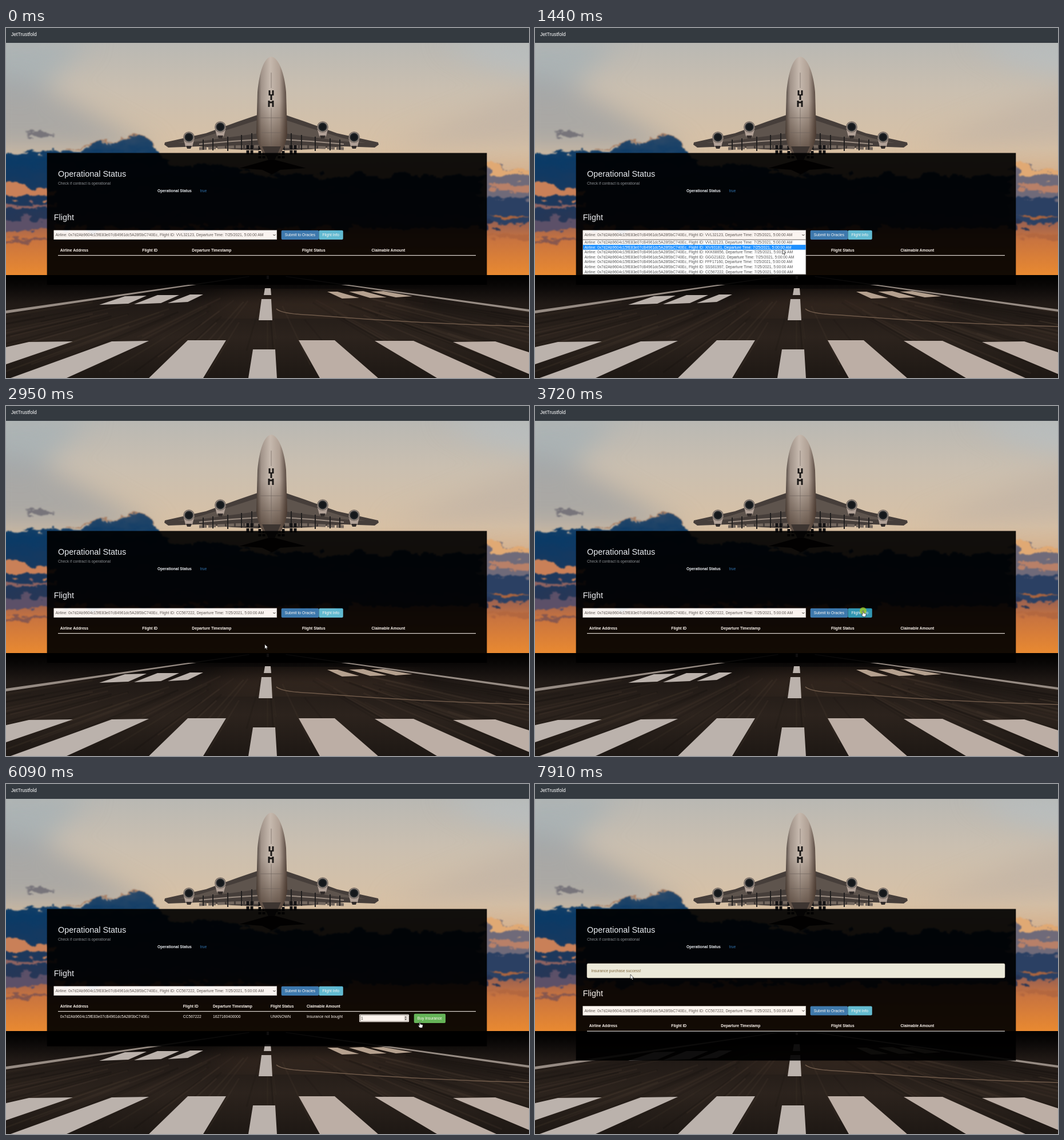
These frames come from a looping animation (915x612 px, 8000 ms). An HTML page:

```html
<!DOCTYPE html>
<html lang="en">
<head>
<meta charset="utf-8">
<title>Flight insurance demo</title>
<style>
html, body { margin: 0; width: 100%; height: 100%; overflow: hidden; background: #000; }
svg { position: absolute; left: 0; top: 0; width: 915px; height: 612px; }
#photo { will-change: transform; }
filter { color-interpolation-filters: sRGB; }
text { font: 6.72px Arial, "Liberation Sans", sans-serif; white-space: pre; }
.h2 { font-size: 14.4px; }
.brand { font-size: 8.64px; }
.b { font-weight: bold; }
</style>
</head>
<body>
<svg id="photo" viewBox="0 0 915 612">
  <defs>
    <linearGradient id="sky" x2="0" y2="1">
      <stop offset="0" stop-color="#b9b8b3"/><stop offset=".2" stop-color="#cabfb0"/>
      <stop offset=".45" stop-color="#d8c1a5"/><stop offset=".6" stop-color="#d2a983"/>
      <stop offset="1" stop-color="#ee8b2c"/>
    </linearGradient>
    <linearGradient id="dusk" x2="0" y2="1">
      <stop offset="0" stop-color="#8d5c56"/><stop offset=".4" stop-color="#c9743f"/>
      <stop offset="1" stop-color="#ea8a30"/>
    </linearGradient>
    <linearGradient id="cloud" x2="0" y2="1">
      <stop offset="0" stop-color="#2c4968"/><stop offset=".25" stop-color="#0a3a66"/>
      <stop offset="1" stop-color="#2b3654"/>
    </linearGradient>
    <linearGradient id="road" x2="0" y2="1">
      <stop offset="0" stop-color="#000"/><stop offset=".1" stop-color="#090706"/>
      <stop offset=".28" stop-color="#211a16"/><stop offset=".6" stop-color="#2c231d"/>
      <stop offset="1" stop-color="#1e1814"/>
    </linearGradient>
    <linearGradient id="hull">
      <stop offset="0" stop-color="#4c423c"/><stop offset=".16" stop-color="#a2948a"/>
      <stop offset=".45" stop-color="#c6b9ae"/><stop offset=".75" stop-color="#b0a094"/>
      <stop offset="1" stop-color="#4f4038"/>
    </linearGradient>
    <linearGradient id="shade" x2="0" y2="1">
      <stop offset=".45" stop-color="#4a3628" stop-opacity="0"/>
      <stop offset="1" stop-color="#3c2c22" stop-opacity=".75"/>
    </linearGradient>
    <radialGradient id="mouth">
      <stop offset=".5" stop-color="#15181b"/><stop offset=".72" stop-color="#2d3032"/>
      <stop offset=".82" stop-color="#9b8f86"/><stop offset="1" stop-color="#5a504a"/>
    </radialGradient>
    <filter id="soft" x="-30%" y="-30%" width="160%" height="160%"><feGaussianBlur stdDeviation="22"/></filter>
    <filter id="blur"><feGaussianBlur stdDeviation=".6"/></filter>
    <filter id="puff" x="-10%" y="-30%" width="120%" height="160%">
      <feTurbulence type="fractalNoise" baseFrequency=".035 .06" numOctaves="4" seed="4"/>
      <feDisplacementMap in="SourceGraphic" scale="30" xChannelSelector="R" yChannelSelector="G"/>
      <feGaussianBlur stdDeviation="1.1"/>
    </filter>
  </defs>

  <rect y="26" width="915" height="410" fill="url(#sky)"/>
  <g filter="url(#soft)">
    <path d="M-40 20H150L60 110-40 100Z" fill="#a3afb5" opacity=".7"/>
    <path d="M-40 80 60 100 270 215-40 215Z" fill="#959ca1" opacity=".65"/>
    <path d="M760 20H960V90L830 60Z" fill="#b7bfc3" opacity=".7"/>
    <path d="M660 210 960 90V200Z" fill="#bcafa3" opacity=".6"/>
  </g>
  <rect y="330" width="915" height="104" fill="url(#dusk)"/>
  <g filter="url(#puff)">
    <path d="M36 184 66 178 82 182 60 188Z" fill="#77747a"/>
    <path d="M-20 219 40 221 85 212 120 214 150 202 190 198 222 190 248 194 262 210 275 232 480 258 860 258V350H-20Z" fill="url(#cloud)"/>
    <path d="M105 211 150 201 190 196 222 189 250 193 262 208" fill="none" stroke="#a67b60" stroke-width="2"/>
    <path d="M-20 275 40 276 90 288 70 297-20 291Z" fill="#c98058"/>
    <path d="M-20 305 50 308 90 303V312L-20 316Z" fill="#8d6260"/>
    <path d="M-20 340 30 332 90 337V350L-20 358Z" fill="#5c5068"/>
    <path d="M-20 374 30 367 90 369 60 375Z" fill="#87574e"/>
    <path d="M830 244 865 238 890 247 940 253V310H830Z" fill="#6f6a79"/>
    <path d="M830 242 858 237 884 246 935 252 930 260 880 257 850 253Z" fill="#e0a974"/>
    <path d="M840 276 885 272 935 283 900 289 850 283Z" fill="#b88068"/>
    <path d="M830 299 880 296 940 303V340L870 345 830 338Z" fill="#2b4063"/>
    <path d="M840 327 880 324 920 329 885 333Z" fill="#a9643f"/>
    <path d="M830 364 870 359 940 361 900 369Z" fill="#b3673f"/>
  </g>

  <g id="plane">
    <path d="M408 245 465 229 525 245 480 248 465 256 448 248Z" fill="#1a1718"/>
    <g id="wing">
      <path d="M443 151 405 164 350 184 278 200 277 204 284 209 338 207 395 212 443 214Z" fill="#463e3a"/>
      <path d="M443 160 400 174 338 193 300 201 340 198 443 184Z" fill="#5e544d"/>
      <path d="M338 203 396 198 443 195" fill="none" stroke="#9b8d82" stroke-width="2"/>
      <path d="M338 211 396 208 443 207" fill="none" stroke="#74685f" stroke-width="5" stroke-dasharray="13 3"/>
      <path d="M345 195V213M362 193V214M388 190V215M412 187V213M430 184V213" stroke="#211f1f" stroke-width="2"/>
      <g id="engine">
        <path d="M365 174 369 189Q375 194 381 189L385 174Z" fill="#b0a096"/>
        <circle cx="375" cy="173" r="9.8" fill="url(#mouth)"/>
        <path d="M370 188 380 188 378 193H372Z" fill="#332d2b"/>
      </g>
      <use href="#engine" x="-55" y="18"/>
      <path d="M423 205V222M430 205V222M444 206V228M451 206V228" stroke="#141314" stroke-width="5" stroke-dasharray="7 2"/>
    </g>
    <use href="#wing" transform="translate(929) scale(-1 1)"/>
    <g id="body">
      <path id="tube" d="M464 50C451 52 443 78 440 112L438 185Q442 214 455 224H475Q488 214 492 185L490 112C487 78 477 52 464 50Z" fill="url(#hull)"/>
      <path d="M464 50C451 52 443 78 440 112L438 185Q442 214 455 224H475Q488 214 492 185L490 112C487 78 477 52 464 50Z" fill="url(#shade)"/>
    </g>
    <path d="M464 78V105M464 140V213M445 157H486M447 183H483" stroke="#6f645d" stroke-width=".7"/>
    <path d="M461 109V118M467 109V118M464 116V126M460 127V138M467 127V138M460 130H468" fill="none" stroke="#1b1817" stroke-width="3"/>
    <path d="M448 207H481L470 231H459Z" fill="#3d3531"/>
  </g>

  <rect y="432" width="915" height="180" fill="url(#road)"/>
  <ellipse cx="540" cy="482" rx="190" ry="16" fill="#5c4433" opacity=".45" filter="url(#soft)"/>
  <g id="streaks" stroke-width="3" filter="url(#blur)"></g>
  <g filter="url(#blur)" fill="#bbb2ac">
    <path d="M425 434 0 494V499L426 435ZM490 434 915 492V496L489 435Z" fill="#968b83"/>
    <path d="M456 433H460V439H456ZM453 455H463L464 467H451ZM447 474H464L466 511H442ZM432 562H471L474 612H424Z"/>
    <path d="M208 469 246 468 214 482 163 484ZM265 467 303 467 271 481 224 483ZM322 466 345 466 318 479 283 481Z"/>
    <path d="M562 461 580 461 618 472 588 473ZM600 461 625 460 666 471 637 472ZM638 461 660 460 711 469 682 471Z" fill="#b5a18f"/>
    <path d="M40 549 117 548 0 588V558ZM185 548 250 547 106 612H8ZM318 546 385 546 345 612H250Z"/>
    <path d="M512 546 575 546 651 612H549ZM645 547 713 547 858 612H754ZM782 549 856 548 915 567V605Z" fill="#bcaea5"/>
    <path d="M473 491Q482 500 535 502Q720 517 915 522" fill="none" stroke="#6f5a4a" stroke-width="1.6"/>
  </g>
</svg>

<svg viewBox="0 0 915 612">
  <rect width="915" height="26" fill="#343a40"/>
  <text class="brand" x="9" y="14" fill="#fff">JetTrustfold</text>
  <g id="panel" opacity=".92"></g>
  <g id="list"></g>
  <g id="pointer">
    <circle id="ring" r="6" fill="#a4cc1e" opacity=".75"/>
    <path id="arrow" d="M0 0V8.2L1.9 6.5 3.2 9.4 4.5 8.8 3.2 6H5.8Z" fill="#fff" stroke="#000" stroke-width=".6"/>
    <path id="hand" d="M-.8 .6Q0-.4 .8 .6V4L4.4 4.8Q5.4 5 5.2 6.4L4.4 10.3H-.2L-3 6.6Q-2.6 5.3-.8 6.5Z" fill="#fff" stroke="#000" stroke-width=".6"/>
    <path id="beam" d="M-1.5-4H1.5M0-4V4M-1.5 4H1.5" stroke="#222" stroke-width=".8"/>
  </g>
</svg>

<script>
const $ = id => document.getElementById(id);
const LOOP = 8000;
const ADDRESS = '0x7d2Ab9604c15fE83e07cB4961dc5A28f3bC740Ec';
const FLIGHTS = ['VVL32123', 'XIV93181', 'KKK68656', 'GGG21822', 'FFF17160', 'SSS61997', 'CC567222'];
const COLUMNS = ['Airline Address', 'Flight ID', 'Departure Timestamp', 'Flight Status', 'Claimable Amount'];
const ROW = [ADDRESS, 'CC567222', '1627160400000', 'UNKNOWN', 'Insurance not bought'];

// Pointer path: time, x, y
const PATH = [
  [0, 838, 624], [220, 838, 624], [420, 672, 500], [640, 520, 402], [900, 466, 364],
  [1310, 466, 364], [1440, 433, 387], [1560, 415, 415], [1690, 407, 429],
  [1800, 407, 429], [2020, 411, 428], [2500, 412, 428], [2750, 443, 421],
  [2900, 443, 421], [3250, 510, 390], [3600, 574, 358], [4260, 574, 358],
  [4450, 635, 407], [4620, 655, 417], [4900, 660, 410], [5710, 660, 410],
  [6090, 724, 416], [6350, 735, 413], [7080, 735, 413], [7300, 600, 388],
  [7600, 300, 345], [7910, 167, 333], [8000, 167, 333]
];
const CLICKS = [[1040, 1110], [2160, 2220], [3720, 3790], [4970, 5110], [6490, 6550]];

const between = (t, a, b) => t >= a && t < b;
const inside = (p, x, y, w, h) => between(p.x, x, x + w) && between(p.y, y, y + h);
const text = (x, y, s, fill = '#fff', cls = '') =>
  `<text x="${x}" y="${y}" fill="${fill}" class="${cls}">${s}</text>`;
const rect = (x, y, w, h, fill, more = '') =>
  `<rect x="${x}" y="${y}" width="${w}" height="${h}" fill="${fill}" ${more}/>`;
const button = (x, y, w, label, fill) =>
  rect(x, y, w, 16.2, fill, 'rx="2"') + text(x + 6, y + 10.5, label);
const option = i =>
  `Airline: ${ADDRESS}, Flight ID: ${FLIGHTS[i]}, Departure Time: 7/25/2021, 5:00:00 AM`;

function pointerAt(t) {
  const i = Math.max(1, PATH.findIndex(k => k[0] > t));
  const [t0, x0, y0] = PATH[i - 1], [t1, x1, y1] = PATH[i];
  const u = (t - t0) / (t1 - t0);
  return { x: x0 + (x1 - x0) * u, y: y0 + (y1 - y0) * u };
}

function amountField(s) {
  const ring = s.focus
    ? rect(618, 402.8, 87, 13.4, '#fff', 'rx="1.5"') + rect(619, 403.8, 85, 11.4, '#222', 'rx="1"')
    : rect(619, 403.5, 85.5, 12, '#777');
  return ring + rect(619.7, 404.3, 84, 10.5, '#fff') +
    text(621, 412, s.typed ? '1' : 'ETH amount', s.typed ? '#333' : '#777') +
    rect(696.5, 405, 5.5, 9, '#e4e4e4') +
    '<path d="M697.5 408.6 699.2 406.2 701 408.6ZM697.5 410.6 699.2 413 701 410.6Z" fill="#444"/>';
}

function drawPanel(s) {
  const xs = s.row ? [94.7, 309.7, 362, 462.7, 526] : [94.7, 238.3, 325.3, 518, 639.5];
  const bottom = s.alert ? 483.6 : s.row ? 458.6 : 449;
  const alert = rect(91, 314, 731, 25, '#fcf8e3', 'rx="2" stroke="#faebcc" stroke-width=".5"') +
    text(98.4, 328.6, 'Insurance purchase success!', '#8a6d3b');
  let flight = text(83.8, 336, 'Flight', '#fff', 'h2') +
    rect(83.8, 353.8, 390, 16, '#fff', 'stroke="#ccc" stroke-width=".5"') +
    text(86.6, 364.4, option(s.chosen), '#555') +
    '<path d="M467.4 361 469.4 363 471.4 361" fill="none" stroke="#222"/>' +
    button(481.7, 353.8, 65.6, 'Submit to Oracles', s.hover === 'submit' ? '#286090' : '#337ab7') +
    button(547.4, 353.8, 42.4, 'Flight Info', s.hover === 'info' ? (s.press ? '#269abc' : '#31b0d5') : '#5bc0de') +
    COLUMNS.map((c, i) => text(xs[i], 390.6, c, '#fff', 'b')).join('') +
    rect(91, 397, 731, 1.2, '#ddd');
  if (s.row) {
    flight += ROW.map((c, i) => text(xs[i], 409.2, c)).join('') + amountField(s) +
      button(713.8, 401.8, 55.2, 'Buy Insurance', s.hover === 'buy' ? '#449d44' : '#5cb85c');
  }
  $('panel').innerHTML = rect(71.7, 218.5, 769.6, bottom - 218.5, '#000') +
    text(91, 260, 'Operational Status', '#fff', 'h2') +
    text(91, 273.8, 'Check if contract is operational', '#999') +
    text(265, 287.4, 'Operational Status', '#fff', 'b') + text(339.6, 287.4, 'true', '#337ab7') +
    (s.alert ? alert : '') + `<g transform="translate(0 ${s.alert ? 34.6 : 0})">${flight}</g>`;
}

function drawList(s) {
  if (!s.open) return $('list').innerHTML = '';
  $('list').innerHTML = rect(83.7, 370.3, 390.2, 60.6, '#fff', 'stroke="#777" stroke-width=".6"') +
    FLIGHTS.map((_, i) => {
      const y = 370.5 + i * 8.6, on = i === s.lit;
      return (on ? rect(84, y, 389.6, 8.6, '#1e90ff') : '') +
        text(86.6, y + 6.5, option(i), on ? '#fff' : '#555');
    }).join('');
}

let shown = '';
function frame(now) {
  const t = now % LOOP, p = pointerAt(t);
  const row = between(t, 3850, 6600), alert = t >= 6600;
  const over = alert ? '' :
    inside(p, 481.7, 353.8, 65.6, 16.2) ? 'submit' :
    inside(p, 547.4, 353.8, 42.4, 16.2) ? 'info' :
    row && inside(p, 713.8, 401.8, 55.2, 16.2) ? 'buy' :
    row && inside(p, 619, 403.5, 85.5, 12) ? 'field' : '';
  const press = CLICKS.some(([a, b]) => between(t, a, b));
  const open = between(t, 1110, 2220);
  const s = {
    row, alert, press, open,
    lit: open ? Math.min(6, Math.max(0, Math.floor((p.y - 370.5) / 8.6))) : 0,
    chosen: t < 2220 ? 0 : 6,
    focus: t >= 4970,
    typed: t >= 5440,
    hover: over === 'buy' && t < 6130 ? '' : over
  };
  const key = JSON.stringify(s);
  if (key !== shown) {
    shown = key;
    drawPanel(s);
    drawList(s);
  }
  const shape = over === 'field' ? 'beam' : over ? 'hand' : 'arrow';
  for (const id of ['arrow', 'hand', 'beam']) $(id).style.display = id === shape ? '' : 'none';
  $('ring').style.display = press ? '' : 'none';
  $('pointer').setAttribute('transform', `translate(${p.x} ${p.y})`);
  requestAnimationFrame(frame);
}

// Blurred asphalt: faint lines fanning out from the horizon
let seed = 7;
const random = () => (seed = seed * 16807 % 2147483647) / 2147483647;
$('streaks').innerHTML = Array.from({ length: 110 }, () => {
  const dx = (random() - .5) * 2600, a = .2 + random() * .3, b = a + .2 + random() * .5;
  return `<path d="M${458 + dx * a} ${432 + 180 * a}L${458 + dx * b} ${432 + 180 * b}"
    stroke="${random() < .5 ? '#000' : '#6a5647'}" opacity="${.05 + random() * .1}"/>`;
}).join('');

frame(performance.now());
</script>
</body>
</html>
```
